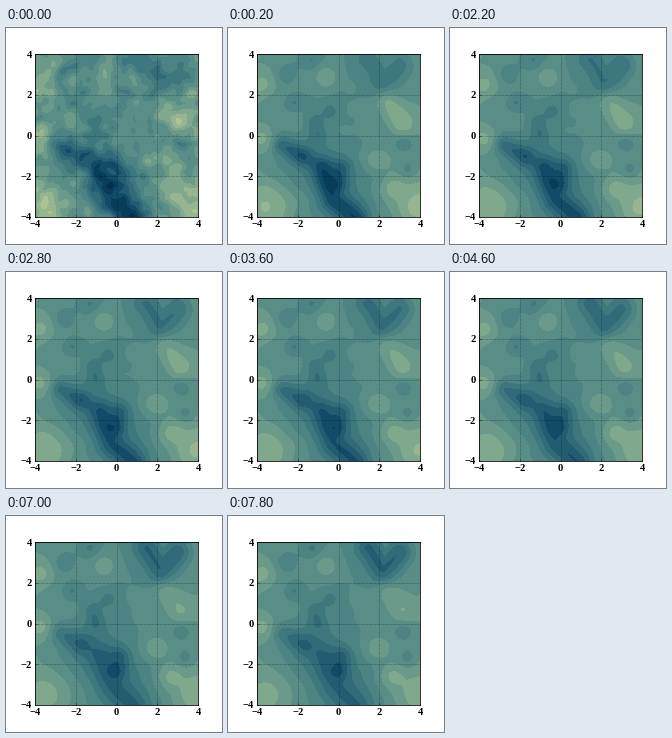
These frames come from a looping animation (216 px wide and 216 px high, 8 s). A matplotlib script:

```python
import numpy as np
import matplotlib.pyplot as plt
from matplotlib.animation import FuncAnimation
from matplotlib.colors import LinearSegmentedColormap

SIZE, DPI = 216, 72
FRAMES, STEP = 40, 200
N = 121

plt.rcParams.update({"font.family": "Liberation Serif", "font.weight": "bold"})

axis = np.linspace(-4, 4, N)
X, Y = np.meshgrid(axis, axis)


def streak(width, *path):
    """Gaussian ridge of height 1 along a path of points."""
    near = np.full_like(X, np.inf)
    for (x0, y0), (x1, y1) in zip(path, path[1:] or path):
        dx, dy = x1 - x0, y1 - y0
        s = ((X - x0) * dx + (Y - y0) * dy) / max(dx * dx + dy * dy, 1e-9)
        s = np.clip(s, 0, 1)
        near = np.minimum(near, (X - x0 - s * dx) ** 2 + (Y - y0 - s * dy) ** 2)
    return np.exp(-near / (2 * width ** 2))


def spots(width, *points):
    return sum(streak(width, p) for p in points)


def noise(rng, width):
    """Unit-variance random field smoothed to the given width."""
    k = 2 * np.pi * np.fft.fftfreq(N, axis[1] - axis[0])
    k2 = k[:, None] ** 2 + k[None, :] ** 2
    spec = np.fft.fft2(rng.normal(size=(N, N))) * np.exp(-k2 * width ** 2 / 2)
    z = np.fft.ifft2(spec).real
    return z / z.std()


rng = np.random.default_rng(12)
grain = 0.03 * noise(rng, 0.14) + 0.025 * noise(rng, 0.24)
wobble = 0.01 * noise(rng, 0.35)

valley = streak(0.42, (-0.8, -1.6), (-0.3, -3.2), (0.9, -4.1))
basin = streak(0.9, (-1.2, -1.2), (0.2, -3.0), (0.8, -4.0))
stem = streak(0.35, (0.2, -1.6), (0.1, -2.3))
arm = streak(0.35, (-2.8, -0.5), (-1.8, -1.0))
peak = streak(0.5, (1.5, 3.7), (2.2, 2.6), (3.0, 3.5))
east = streak(0.42, (2.4, 1.6), (3.1, 0.7))
corners = spots(0.8, (-3.3, -3.5), (3.8, -3.4))
dips = spots(0.33, (-1.2, 0.7), (-0.4, 1.2), (-2.2, 1.6), (-1.3, 3.7),
             (-2.6, 3.0), (-1.0, 0.1), (3.2, -0.4), (3.4, -1.7))
domes = spots(0.42, (-0.6, 2.8), (1.9, -1.2), (2.6, -2.6), (-3.7, -0.2),
              (-3.7, 2.4))
base = 0.5 + 0.07 * (X / 4) ** 2 - 0.1 * dips + 0.11 * domes


def smooth_field(w):
    """Field after a share w of the slow drift."""
    def fade(start, end):
        return start + w * (end - start)

    return (base + fade(1, 0.3) * wobble
            - fade(0.24, 0.08) * valley - fade(0.12, 0.16) * basin
            - fade(0.15, 0.14) * stem - fade(0.22, 0.13) * arm
            - fade(0.14, 0.25) * peak
            + fade(0.16, 0.10) * east + fade(0.18, 0.12) * corners)


def field(i):
    if i == 0:
        return 0.5 + 1.15 * (smooth_field(0) - 0.5) + grain
    return smooth_field((i - 1) / (FRAMES - 2))


cmap = LinearSegmentedColormap.from_list("deep", [
    "#022e50", "#0f4a66", "#2d6878", "#467f82",
    "#5f9389", "#86ab8e", "#aec493", "#c8d49a"])
levels = np.linspace(0, 1, 15)

fig = plt.figure(figsize=(SIZE / DPI, SIZE / DPI), dpi=DPI, facecolor="white")
ax = fig.add_axes([29 / SIZE, 27 / SIZE, 163 / SIZE, 163 / SIZE])
ax.set(xlim=(-4, 4), ylim=(-4, 4),
       xticks=range(-4, 5, 2), yticks=range(-4, 5, 2))
ax.set_axisbelow(False)
ax.grid(color="black", linestyle=":", linewidth=0.5, alpha=0.8)
ax.tick_params(direction="in", length=2, width=0.5, pad=3, labelsize=10.5)
for spine in ax.spines.values():
    spine.set_linewidth(0.8)

shown = []


def draw(i):
    while shown:
        shown.pop().remove()
    z = np.clip(field(i), 0.001, 0.999)
    shown.append(ax.contourf(X, Y, z, levels=levels, cmap=cmap,
                             vmin=0.04, vmax=0.96))
    return shown


anim = FuncAnimation(fig, draw, frames=FRAMES, interval=STEP,
                     init_func=lambda: draw(0), repeat=True, repeat_delay=0)
plt.show()
```
